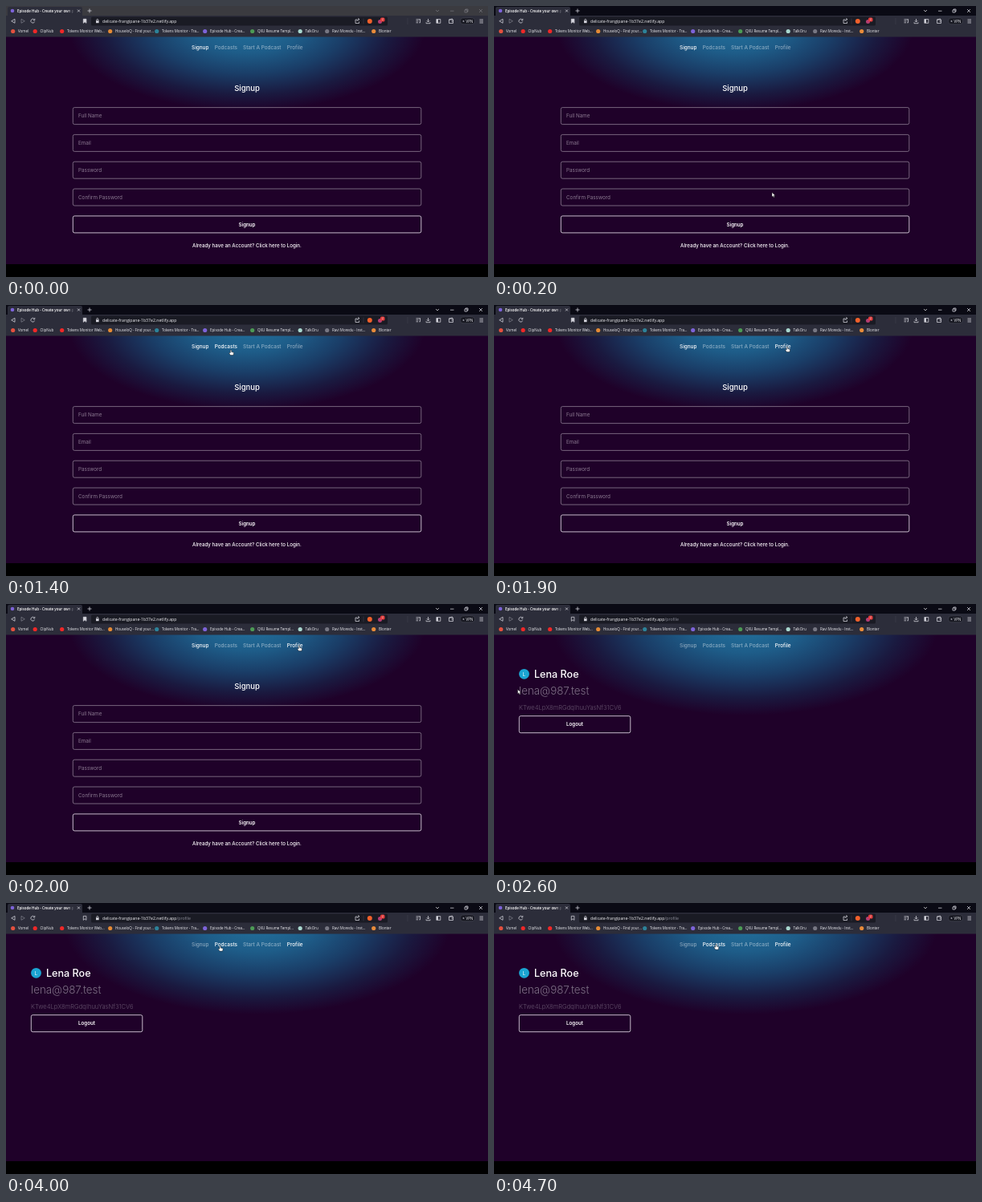
Animation, 600 px wide and 338 px high, one loop 5 s. Source, as an HTML page:

```html
<!DOCTYPE html>
<html lang="en">
<head>
<meta charset="utf-8">
<title>Signup and profile</title>
<style>
  html, body { margin: 0; width: 100%; height: 100%; overflow: hidden; background: #000; }
  svg { display: block; width: 100vw; height: 100vh; }
  text { fill: #fff; font: 500 6.3px Inter, sans-serif; white-space: pre; }
  .ui text { font: 400 4.5px "Open Sans", sans-serif; fill: #f0f0f4; }
  .ui .title { font-weight: 600; fill: #fff; }
  .ui .url { font-size: 5.17px; }
  .icon { fill: none; stroke: #d6d6de; stroke-width: .75; }
  .box { fill: none; stroke: #86768c; stroke-width: .85; }
  .bright { stroke: #e2dce5; stroke-width: .85; }
  .hint { fill: #8b7b91; font-weight: 400; }
  .mid { text-anchor: middle; }
  .strong { font-weight: 600; font-size: 6.2px; }
  .nav { font-size: 6.4px; }
  .cursor { fill: #fff; stroke: #111; stroke-width: .45; stroke-linejoin: round; }
</style>
</head>
<body>
<svg viewBox="0 0 600 338">
  <defs>
    <radialGradient id="glow" gradientUnits="userSpaceOnUse" cx="0" cy="0" r="1">
      <stop offset="0" stop-color="#22719d"/>
      <stop offset=".3" stop-color="#1e5d89"/>
      <stop offset=".55" stop-color="#1a3e68"/>
      <stop offset=".8" stop-color="#1a1a40"/>
      <stop offset="1" stop-color="#1f0129"/>
    </radialGradient>
    <linearGradient id="fade">
      <stop offset="0" stop-color="#2c2d3a" stop-opacity="0"/>
      <stop offset="1" stop-color="#2c2d3a"/>
    </linearGradient>
  </defs>

  <rect y="38" width="600" height="284" fill="url(#glow)"/>
  <g id="signup"></g>
  <g id="profile"></g>
  <g id="nav"></g>

  <g class="ui">
    <rect id="strip" width="600" height="13"/>
    <rect y="12" width="600" height="26.5" fill="#2c2d3a"/>
    <path d="M2 12V3q0-2 2-2h89q2 0 2 2v9z" fill="#2c2d3a"/>
    <rect x="106" y="13.5" width="369" height="11" rx="1.5" fill="#1a1b24"/>
    <circle cx="8" cy="6" r="2.3" fill="#7d63d8"/>
    <text class="title" x="14" y="7.7">Episode Hub - Create your own p</text>
    <rect x="76" y="2" width="9" height="8" fill="url(#fade)"/>
    <path class="icon" d="M89 4.5l3 3m0-3l-3 3M101.5 6h5M104 3.5v5"/>
    <path id="controls" class="icon" d="M535 5l2 2 2-2M553 6.2h4.5M571 5h3v3h-3zM572 5V4h3v3h-1M589 4l4 4m0-4l-4 4"/>
    <path class="icon" d="M11 16.3v5L6.7 18.8zM35.2 17.2a2.4 2.4 0 1 0 .4 2.3M35.8 15.8v2h-2"/>
    <path class="icon" d="M19 16.3v5l4.3-2.5z" opacity=".45"/>
    <path id="mark" class="icon" d="M96.3 16.3h3.6v5l-1.8-1.5-1.8 1.5z"/>
    <path class="icon" d="M112.7 18.5v-1a1.1 1.1 0 0 1 2.2 0v1"/>
    <rect x="112" y="18.3" width="3.6" height="2.9" fill="#d6d6de"/>
    <text class="url" x="120" y="20.9">delicate-frangipane-1b37e2.netlify.app<tspan id="path" fill="#8c8d99">/profile</tspan></text>
    <path class="icon" d="M437 17h-2v4.5h4.5v-2M436.8 19q.3-2.4 3-2.4m-1.5-1.3l1.6 1.3-1.6 1.4"/>
    <path d="M445 15.5v7" stroke="#3d3e4c" stroke-width=".6"/>
    <circle cx="452.8" cy="19" r="3" fill="#f2602b"/>
    <circle cx="465.5" cy="19.5" r="2.5" fill="#b53e72"/>
    <rect x="466" y="14.5" width="5.5" height="5" rx="1.5" fill="#e23b3b"/>
    <text x="467.8" y="18.3" style="font-size:3.5px">2</text>
    <path class="icon" d="M510.5 16.8h5.5M510.5 18.8h3M510.5 20.8h2.5M515.5 16.8v4h-1.3M525.5 16v4m-1.8-1.8l1.8 1.8 1.8-1.8M523 20.3v1.4h5v-1.4M535.8 16.5h5v4.8h-5zM551.5 17h5v4.5h-5zM551.5 17l4-1v1M554.5 19h2M589.5 17h4.5M589.5 19h4.5M589.5 21h4.5"/>
    <rect x="536" y="16.7" width="1.9" height="4.4" fill="#d6d6de"/>
    <rect x="565.5" y="14.8" width="18" height="8" rx="3.5" fill="#191a23" stroke="#474856" stroke-width=".6"/>
    <circle cx="569.5" cy="18.9" r=".9" fill="#aaaab5"/>
    <text x="572.5" y="20.5">VPN</text>
    <path d="M500 15v8" stroke="#434453" stroke-width=".5"/>
    <g id="bookmarks"></g>
  </g>

  <g id="cursor" class="cursor">
    <path id="arrow" d="M0 0v5.6l1.3-1.2.9 1.9 1-.45-.85-1.85h1.75z"/>
    <path id="hand" d="M-.7 3.5V.4q.7-.9 1.4 0v2.2l2.3.5q.6.2.5.9l-.5 2.6H-.6L-2.4 4q.4-.8 1.2-.1z"/>
  </g>
</svg>
<script>
const $ = id => document.getElementById(id);
const text = (x, y, s, cls = '', style = '') =>
  `<text x="${x}" y="${y}" class="${cls}" style="${style}">${s}</text>`;
const box = (x, y, w, cls = '') =>
  `<rect class="box ${cls}" x="${x}" y="${y}" width="${w}" height="21" rx="2"/>`;

const hints = ['Full Name', 'Email', 'Password', 'Confirm Password'];
$('signup').innerHTML =
  text(300, 105.6, 'Signup', 'mid', 'font-size:9.5px') +
  hints.map((s, i) => box(83.3, 126.6 + i * 33.8, 433.5) +
    text(90, 139.4 + i * 33.8, s, 'hint')).join('') +
  box(83.3, 261.9, 433.5, 'bright') +
  text(300, 274.5, 'Signup', 'mid strong') +
  text(300, 301.3, 'Already have an Account? Click here to Login.', 'mid', 'font-size:6.2px');

$('profile').innerHTML =
  '<circle cx="37.5" cy="87.3" r="6.4" fill="#1ba5d2"/>' +
  text(37.5, 89.7, 'L', 'mid', 'font-size:6px;font-weight:400') +
  text(50, 92, 'Lena Roe', '', 'font-size:12.6px') +
  text(31, 112.6, 'lena@987.test', '', 'font-size:13.4px;font-weight:300;fill:#7d6f84') +
  text(31, 131.5, 'KTwe4LpX8mRGdqIhuuYasNf31CV6', '', 'font-size:7.6px;font-weight:300;fill:#65536d') +
  box(31.3, 139.7, 138.5, 'bright') +
  text(100.5, 152.4, 'Logout', 'mid strong');

const links = [[231, 252, 'Signup'], [259.7, 287, 'Podcasts'], [295, 342, 'Start A Podcast'], [349.8, 369, 'Profile']];
$('nav').innerHTML = links.map(([x, , s]) => text(x, 54.2, s, 'nav')).join('');

const bookmarks = [
  [5.5, '#e2503f', 'Vomel'], [33, '#f02828', 'ClipNub'], [66.5, '#f02828', 'Tokens Monitor Web...'],
  [126.5, '#e48a35', 'HouseloQ - Find your...'], [184.5, '#2d8299', 'Tokens Monitor - Tra...'],
  [244.5, '#7d63d8', 'Episode Hub - Crea...'], [303.5, '#4c9a55', 'QXU Resume Templ...'],
  [363, '#a9d8cf', 'TalkOru'], [396.5, '#777783', 'Ravi Moredu - Inst...'], [454.5, '#e88b3a', 'Blonter']
];
$('bookmarks').innerHTML = bookmarks.map(([x, color, s]) =>
  `<circle cx="${x + 3.2}" cy="31.5" r="2.6" fill="${color}"/>` + text(x + 9.5, 33.2, s)).join('');

// Pointer route: time in ms, x, y of the tip
const route = [
  [100, 350, 295], [300, 342, 170], [500, 333, 100], [600, 333, 100], [700, 310, 72],
  [800, 290, 56], [900, 276.3, 51], [1000, 262, 54], [1100, 226, 75], [1200, 250, 101],
  [1400, 280, 56], [1600, 325, 52.5], [1800, 363, 52], [1900, 365, 52], [2200, 365, 52],
  [2400, 214, 88], [2600, 29.5, 106.5], [2700, 4, 112], [2800, 12, 118], [3000, 38, 105],
  [3300, 244.5, 79.5], [3600, 354, 53], [3800, 308, 53], [4000, 266.6, 53.5],
  [4300, 270, 53], [4700, 276.3, 51.5]
];

function tipAt(t) {
  const i = route.findIndex(p => p[0] >= t);
  if (i <= 0) return route[0].slice(1);
  const [t0, x0, y0] = route[i - 1], [t1, x1, y1] = route[i];
  const k = (t - t0) / (t1 - t0);
  return [x0 + (x1 - x0) * k, y0 + (y1 - y0) * k];
}

const show = (id, on) => $(id).style.display = on ? '' : 'none';

function draw(now) {
  const t = Math.min(Math.floor(now % 5000 / 100) * 100, 4700);
  const started = t >= 100, onProfile = t >= 2100;
  const [x, y] = tipAt(t);
  const hover = started && y > 46 && y < 57 ? links.findIndex(l => x >= l[0] && x <= l[1]) : -1;
  const active = onProfile ? 3 : 0;

  show('signup', !onProfile);
  show('profile', onProfile);
  show('path', onProfile);
  $('glow').setAttribute('gradientTransform', onProfile
    ? 'translate(313 27) scale(240 112)' : 'translate(300 27) scale(222 104)');
  $('mark').style.fill = onProfile ? 'none' : '#d6d6de';
  $('strip').style.fill = started ? '#0a0a14' : '#3b3b40';
  $('controls').style.opacity = started ? 1 : .35;
  [...$('nav').children].forEach((el, i) =>
    el.style.fillOpacity = i === hover || i === active ? 1 : .48);

  show('cursor', started);
  show('hand', hover >= 0);
  show('arrow', hover < 0);
  $('cursor').setAttribute('transform', `translate(${x} ${y})`);
}

const start = performance.now();
(function tick() {
  draw(performance.now() - start);
  requestAnimationFrame(tick);
})();
</script>
</body>
</html>
```
